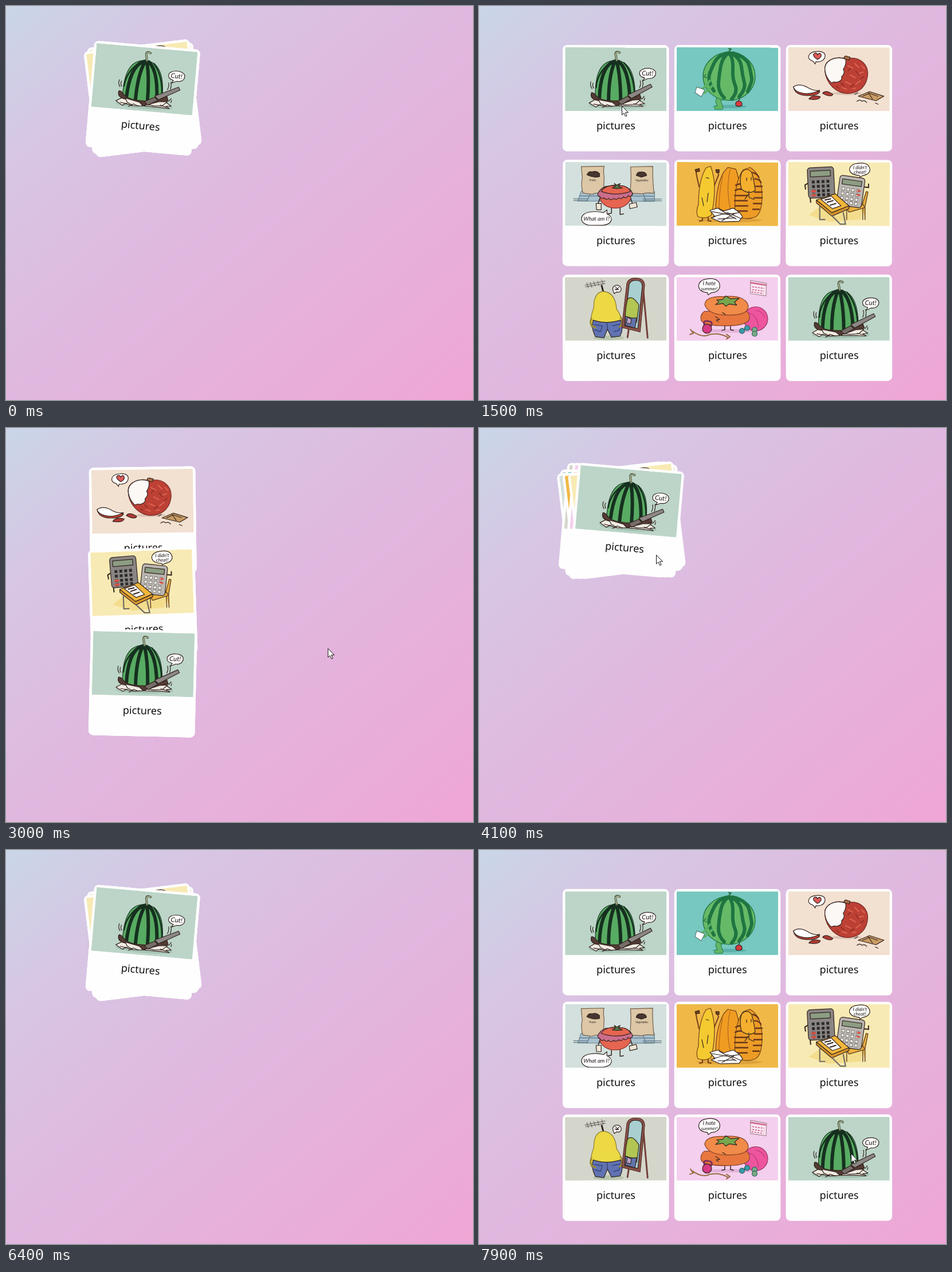
An HTML page for the animation above (8000 ms loop, 815 by 687 pixels).

```html
<!DOCTYPE html>
<html lang="en">
<head>
<meta charset="utf-8">
<title>Picture cards</title>
<style>
  html, body { margin: 0; width: 100%; height: 100%; overflow: hidden; }
  body { background: linear-gradient(to bottom right, #c9d6e8, #d7c6e4 20%, #e0b8df 50%, #efa6d6); }
  #stage { display: block; width: 815px; height: 687px; }
  text { font-family: "Noto Sans", sans-serif; text-anchor: middle; stroke: none; fill: #111; }
  .card text { font-size: 18px; }
  symbol { stroke: #33241f; stroke-width: 1.2; stroke-linejoin: round; stroke-linecap: round; fill: none; }
  symbol text { font: italic 500 9px Lato, sans-serif; fill: #2d2422; }
  .bg { stroke: none; }
  .bubble { fill: #fff; }
</style>
</head>
<body>
<svg id="stage" viewBox="0 0 815 687">
  <defs>
    <symbol id="cut" viewBox="0 0 177 111">
      <rect class="bg" width="177" height="111" fill="#bcd5c8"/>
      <ellipse class="bg" cx="92" cy="101" rx="50" ry="6" fill="#a6c3b5"/>
      <path d="M53 88C52 58 56 23 88 23C117 23 123 58 122 88Q88 104 53 88z" fill="#58ab62" stroke="#1f3a28"/>
      <path d="M84 25C68 31 61 58 60 88M87 24C79 42 76 66 76 92M90 24C95 44 97 66 97 94M94 25C107 36 112 62 113 90" stroke="#16301f" stroke-width="6"/>
      <path d="M103 27Q119 46 121 78M78 27Q56 44 54 70" stroke="#16301f" stroke-width="2.5"/>
      <path d="M90 23L88 12Q88 6 95 9" stroke="#4b5841" stroke-width="4"/>
      <path d="M90 22L88 12Q89 7 95 9" stroke="#a8b08f" stroke-width="2"/>
      <path d="M42 97l12-7 15 3 14 9-14 1-9-3-6 4zM92 102l11-9 26-1 10 6-9 1 6 4-16-1z" fill="#efeae2"/>
      <path d="M46 79c-3 9 4 14 16 14c10 2 16 9 28 9c14-7 30-9 43-13l-3-8c-8 7-22 11-36 12c-20 1-34-1-40-9q-3-5-8-5z" fill="#533b34"/>
      <path d="M58 91l25 5 7 6-17 1-11-5zM98 99l20-7 14-1-9 8-15 1z" fill="#efeae2"/>
      <path d="M109 83L149 64l3 5-36 20z" fill="#8c8784"/>
      <path d="M92 94l17-9 6 5-17 10z" fill="#776d68"/>
      <path d="M65 105l8-5 9 3M50 99l12 2M120 98l11 3M45 60q-2 7 2 12M49 62q-2 5 1 9M131 58q2 6-1 12M135 57q2 6 0 12M134 90l4-5M138 92l1-4"/>
      <path class="bubble" d="M139 53q-10-2-9-9c1-9 24-11 28-1c1 9-7 12-13 11l-9 4z"/>
      <text x="144" y="49" style="font-size:11.500px">Cut!</text>
    </symbol>
    <symbol id="reader" viewBox="0 0 177 111">
      <rect class="bg" width="177" height="111" fill="#76c8c0"/>
      <ellipse class="bg" cx="92" cy="103" rx="30" ry="3" fill="#5cb0aa"/>
      <path d="M85 87l-12 4 5 14h-9M74 84l-3 10 3 8" stroke="#2c7f48" stroke-width="7"/>
      <path d="M85 87l-12 4 5 14h-9M74 84l-3 10 3 8" stroke="#62b666" stroke-width="5"/>
      <ellipse cx="91.5" cy="50.500" rx="45.5" ry="42" fill="#66ba67" stroke="#21713f"/>
      <g stroke="#1f7541" stroke-width="6">
        <path d="M88 10Q72 14 66 26T57 48T65 76M90 10Q80 17 77 32T73 62T83 88M92 10Q99 20 98 37T102 66T96 90M95 10Q111 18 113 34T118 61T109 86M98 10Q123 16 127 34T131 56T124 77"/>
      </g>
      <path d="M92 10q-2-4 3-7l-4-1" stroke="#286b3d" stroke-width="2"/>
      <path d="M58 58l-10 12-7 4M62 67l-13 12-8-1" stroke="#5bb164" stroke-width="4"/>
      <path d="M35 69l14 5-6 12-11-7z" fill="#fff" stroke="#557d78"/>
      <path d="M51 47l-4 4 5 2M55 43l3 1" stroke="#1e613a"/>
      <path d="M108 93q-8 3-4 9q6 2 10-1q1-7-6-8zM108 93l2-3" fill="#d73b40"/>
    </symbol>
    <symbol id="lychee" viewBox="0 0 177 111">
      <rect class="bg" width="177" height="111" fill="#f2e0d1"/>
      <ellipse class="bg" cx="102" cy="80" rx="26" ry="3" fill="#dcc3b3"/>
      <path d="M102 20C124 14 142 30 138 52C134 74 116 82 98 80C76 76 62 54 64 34C66 22 84 14 102 20z" fill="#bd4035" stroke="#6f2822"/>
      <path d="M100 20C80 14 62 24 64 40C65 50 70 57 75 62q6-3 8-1q12-2 10-10q7-6 3-13q6-8 4-18z" fill="#fbf8f6"/>
      <path d="M104 32l8 4M116 28l7 7M124 45l7-2M108 48l9 5M100 60l9 4M118 64l8-6M94 70l8 3M112 72l6-1M128 32l5 5" stroke="#dc6551" stroke-width="2"/>
      <path d="M104 41l5-5M118 41l5 7M126 55l6-4M92 62l5 5M108 69l7-4M84 68l5 4" stroke="#7d2923"/>
      <path d="M98 20q-2-5 3-5l7 2-2 5z" fill="#a96c43"/>
      <path class="bubble" d="M50 7c12-1 15 5 14 9c-1 8-10 10-16 9l-1 4-4-5c-12-3-10-16 7-17z"/>
      <path d="M51 21q-11-7-5-11q4-1 5 3q3-5 6-1q2 5-6 9z" fill="#dd5a59"/>
      <path d="M9 69Q12 84 34 84Q52 84 55 77L34 76z" fill="#bd4035"/>
      <path d="M9 69Q18 62 32 69Q44 77 55 75Q36 84 21 79Q11 76 9 69z" fill="#fff"/>
      <path d="M36 90q5-8 20-4q-2 7-20 4zM60 80q5-7 18 2q-4 6-18-2z" fill="#b23a36"/>
      <path d="M122 85l20-8 25 8-14 8z" fill="#c99c64"/>
      <path d="M130 85l12-5 14 5M139 78l8 12M121 79l-5 3M120 94q4-4 9 0q4-3 8 2M152 97l5 2"/>
    </symbol>
    <symbol id="tomato" viewBox="0 0 177 111">
      <rect class="bg" width="177" height="111" fill="#d3e0dd"/>
      <path d="M28 51H156V68H22z" fill="#a8c1cf" stroke="#6f8794"/>
      <path d="M15 64H40M15 67H40M136 64h32M136 67h32M46 51l-8 17M66 51l-6 17M112 51l4 17M135 51l6 17M25 59H156" stroke="#617783"/>
      <path d="M28 8l40-1q-2 8 0 18l-1 31q-12-4-20 0l-16-2q-4-14-1-26zM114 8l39-1q-1 18 2 47q-14-2-20 1l-22-1q3-25 1-46z" fill="#dcc7a6" stroke="#745d4b"/>
      <path d="M38 22q3-7 9-5q7-3 13 3v5q-10 3-22-3zM124 23q2-7 8-6q9-1 10 6l-9 3z" fill="#463530"/>
      <text x="48" y="33" style="font-size:5px">Fruits</text>
      <text x="134" y="33" style="font-size:5px">Vegetables</text>
      <path d="M81 74v15l-6 1M96 74v17l6-1M61 62l-4 12M114 62l4 11" stroke-width="1.5"/>
      <ellipse cx="87.500" cy="60" rx="27" ry="20" fill="#e66550" stroke="#8a332c"/>
      <path d="M57 55q4-9 14-13h32q13 4 15 14q-5 6-8 2q-4 7-8 2q-4 6-8 2q-5 5-9 1q-5 5-9 0q-5 4-8-1q-5 4-8-3q-3 2-3-4z" fill="#cc6d8c"/>
      <path d="M63 51q5-9 17-10h20q11 2 14 10q-25 9-51 0z" fill="#e66550"/>
      <path d="M82 45l6-3-2-5 4 3 6-3-3 5 7 3-10 1z" fill="#557849"/>
      <path d="M54 72h9v11h-8zM112 73l12-3 2 8-13 3z" fill="#eee6d6"/>
      <path class="bubble" d="M67 88l6-5 0 7c12 5 11 18-7 20H43C24 108 24 90 43 87q13-2 24 1z"/>
      <text x="55" y="102" style="font-size:9.5px">What am I?</text>
    </symbol>
    <symbol id="bananas" viewBox="0 0 177 111">
      <rect class="bg" width="177" height="111" fill="#f0b847"/>
      <ellipse class="bg" cx="92" cy="101" rx="57" ry="4" fill="#dda23b"/>
      <path d="M39 43L35 25l-2-11M65 42l8-20-2-6M45 94v8l-5 1M55 94v8l5 1" stroke-width="2" stroke="#744116"/>
      <path d="M32 13l7-2 1 5-6 1zM68 13l6 0v5h-5z" fill="#744116"/>
      <path d="M51 10l8-3q7 18 7 40q-1 30-6 46q-10 7-23 2q-4-8 1-22q0-42 13-63z" fill="#f4ca30" stroke="#744116"/>
      <path d="M68 82Q69 40 82 17l7-8 14 3q10 25 6 73q-20 13-41-3z" fill="#f09c22" stroke="#744116"/>
      <path d="M80 24q-7 33-6 62M93 13q-8 36 2 74" stroke="#af661e"/>
      <path d="M102 92Q99 35 116 13l12-4q21 12 21 50q0 29-11 36-18 8-36-3z" fill="#ec9c25" stroke="#744116"/>
      <path d="M103 40q10-5 17 1M102 49q10-5 20 1M101 58h22M101 67h22M102 76h22M103 85h20M133 18q8 2 10 8M136 29q8 0 11 6M138 42h11M136 52h13M135 62h14M134 72h14M133 82h11" stroke="#69371c" stroke-width="2.5"/>
      <path d="M113 18q9-11 18 0q5 20 6 31q-11 8-24-2q-4-15 0-29z" fill="#f4af2e"/>
      <path d="M122 27v5M130 26v5M126 50v11l9 4M126 55l-7 9M51 27l5 1M44 62l3 14M55 54l-2 15"/>
      <path d="M58 84l14-4 10 5 17-5 11 8 5 7-6 8-33 1-16-7 7-2z" fill="#fff"/>
      <path d="M61 86l26 5 22-3M64 95l25-7 23 10M74 82l30 17M79 102l23-13M72 99l30-2"/>
    </symbol>
    <symbol id="calculators" viewBox="0 0 177 111">
      <rect class="bg" width="177" height="111" fill="#f8eab4"/>
      <path class="bg" d="M36 92l21-16 74 4-5 20-56 4z" fill="#f3dd8d"/>
      <path d="M36 36l-7 4 1 7M132 43l8 1v-6M38 60l1 10" stroke-width="2"/>
      <g transform="rotate(-3 56 35)">
        <rect x="34" y="9" width="46" height="53" rx="5" fill="#898583"/>
        <path d="M39 15h35v10H39z" fill="#8c9d83"/>
        <path d="M41 34h34M41 42h34M41 50h34M41 57h34" stroke="#2c2a2b" stroke-width="5" stroke-dasharray="5 3.5" stroke-linecap="butt"/>
        <path d="M41 57h5M41 50h5" stroke="#d95449" stroke-width="4"/>
      </g>
      <path d="M129 74l7-23 3 1-5 25v23M102 78v22M130 80v20M101 79l28-7 5 7-28 8z" fill="#edb13d" stroke="#70502b" stroke-width="1.6"/>
      <g transform="rotate(8 109 50)">
        <rect x="87" y="25" width="44" height="52" rx="5" fill="#bab6b1"/>
        <path d="M92 31h34v9H92z" fill="#8c9d83"/>
        <path d="M93 48h34M93 56h34M93 64h34M93 71h34" stroke="#55504d" stroke-width="5.500" stroke-dasharray="5 3.5" stroke-linecap="butt"/>
        <path d="M93.500 48h34M93.500 56h34M93.500 64h34M93.500 71h34" stroke="#f2eee7" stroke-width="4" stroke-dasharray="4 4.5" stroke-linecap="butt"/>
        <path d="M121 48h4M121 55h4" stroke="#d95449" stroke-width="3"/>
      </g>
      <path d="M49 66l33-11 24 21-30 12z" fill="#f0b53a"/>
      <path d="M49 66v5l27 23 30-13v-5L76 88z" fill="#d6942c"/>
      <path d="M55 77v23h9M76 93l15 15h9l-4-20" stroke="#716b63" stroke-width="2.2"/>
      <path d="M57 65l18-6 17 17-15 5z" fill="#fff"/>
      <path d="M64 66l10-2M68 70l10-3M73 75l10-3" stroke-width="2"/>
      <path class="bubble" d="M115 3q17-4 24 2c8 10 0 17-9 18l-5 3-1-3c-20-1-22-15-9-20z"/>
      <text x="125" y="12" style="font-size:8.500px">I didn't</text>
      <text x="125" y="20" style="font-size:8.500px">cheat!</text>
    </symbol>
    <symbol id="pear" viewBox="0 0 177 111">
      <rect class="bg" width="177" height="111" fill="#d5d6cb"/>
      <ellipse class="bg" cx="76" cy="106" rx="27" ry="4" fill="#b7c5ad"/>
      <path d="M35 14l35-7M36 17l34-6M38 10l3 9M44 9l3 9M50 8l3 8M57 7l2 8M64 5l3 8" stroke="#6d6962"/>
      <path d="M67 26l-3-11" stroke-width="3"/>
      <path d="M66 25Q50 27 50 54q-7 17-4 33h53q2-17-9-31Q88 26 66 25z" fill="#ecd944" stroke="#8c7b2f"/>
      <path d="M49 75q23 8 48 0q6 15-1 28l-15 2-7-14-6 15-15-2q-8-15-4-29z" fill="#6072b1"/>
      <path d="M73 79l1 12M51 83l14 2-3 10-11-3M83 85l13-3-2 11-9 2" stroke="#303d72"/>
      <path d="M46 72q-5 13 7 16M97 70q7 9-2 17" stroke="#9b8a36" stroke-width="3"/>
      <path class="bubble" d="M84 24c-4-11 12-13 14-4c0 7-5 7-8 6l-4 3z"/>
      <path d="M88 17l4 4M94 18l-5 5M87 21l7 1"/>
      <path d="M136 15l8 91M112 85l-3 20" stroke="#74413c" stroke-width="3"/>
      <path d="M108 11Q111 1 125 2q13 0 14 12l-8 82-32-8z" fill="#8b5148" stroke="#553330"/>
      <path d="M112 13q3-8 12-7 11 0 11 10l-8 74-23-5z" fill="#a9cfd0"/>
      <path d="M109 39q8-9 20 10l-4 30-20-4q0-20 4-36z" fill="#b2c653"/>
      <path d="M105 68q11 5 20 3l-3 18-17-5z" fill="#6173ab"/>
      <path d="M109 70l7 4-2 8-7-2z" fill="#b7a2c8"/>
    </symbol>
    <symbol id="persimmon" viewBox="0 0 177 111">
      <rect class="bg" width="177" height="111" fill="#f4cfee"/>
      <ellipse class="bg" cx="91" cy="94" rx="50" ry="3" fill="#e2b2d9"/>
      <circle cx="138" cy="73" r="21" fill="#ee559e" stroke="#96385f"/>
      <path d="M138 58q13 2 16 13M126 63q15 4 17 25" stroke="#b93b78"/>
      <path d="M84 82v10l-5 1M94 82v10l5 1" stroke-width="1.5"/>
      <path d="M48 60Q40 66 43 76q5 9 43 9 38 0 41-12 2-10-9-16z" fill="#e7773e" stroke="#854028"/>
      <path d="M49 48Q50 33 82 34q38-3 43 16 1 15-26 16-43 3-50-18z" fill="#f18b49" stroke="#854028"/>
      <path d="M70 40l10-1 6-6 8 5 15-1-8 7 4 5-13-2-6 4-5-5-13 2 6-5z" fill="#77a64d"/>
      <path d="M68 69l7 5-6 1 4 3M80 62l5 3"/>
      <path d="M49 84q-5-9 7-7 8 1 4 8" stroke="#802d5c" stroke-width="3"/>
      <circle cx="53" cy="90" r="8" fill="#d83a83"/>
      <path d="M24 91l5 7-6 2M27 94q18 13 31 6 17-3 31 5M87 100l6 4-6 4" stroke="#9a6b45" stroke-width="2"/>
      <g stroke="#315c64"><path d="M115 93l9-5" stroke-width="3"/><circle cx="114" cy="94" r="4.500" fill="#399ba8"/><circle cx="123" cy="89" r="4.500" fill="#399ba8"/><circle cx="136" cy="92" r="4.500" fill="#78ac83"/><circle cx="136" cy="99" r="4.500" fill="#78ac83"/></g>
      <path class="bubble" d="M46 5Q66-1 74 9c5 12-4 18-13 18l-6 4-1-4c-19-1-19-17-8-22z"/>
      <text x="57" y="14" style="font-size:9.500px">I hate</text>
      <text x="57" y="23" style="font-size:8px">summer!</text>
      <path d="M129 6l28 5-1 22-27-4z" fill="#fbe9f3" stroke="#a5848f"/>
      <path d="M130 10l25 4" stroke="#d07098" stroke-width="3"/>
      <path d="M132 17l21 3M132 22l21 3M131 26l21 3" stroke="#d07098" stroke-width="2" stroke-dasharray="3 2" stroke-linecap="butt"/>
    </symbol>
  </defs>
  <g id="cards"></g>
  <path id="cursor" d="M.5.5V16L4 12.700L6.500 18.500L9 17.500L6.500 11.800H11.500z" fill="#fff" stroke="#111"/>
</svg>
<script>
const LOOP = 8000, STEP = 100, MOVE = 400;
const PITCH_X = 194.75, PITCH_Y = 195;
const rowTilt = [-3, -7, 5];

// column by column, so each column lies over the one to its left
const pictures = ['cut', 'tomato', 'pear', 'reader', 'bananas', 'persimmon', 'lychee', 'calculators', 'cut'];

// start time, opens?, instant?
const phases = [
  [0, 0, true], [790, 1], [2484, 0], [4040, 1], [6400, 0, true], [7112, 1]
];

// pointer visits: time, x, y
const visits = [
  [[300, 678, 119], [500, 430, 150], [700, 249, 174], [1500, 249, 174], [1700, 249, 181], [1800, 249, 181],
   [2000, 400, 340], [2200, 627, 461], [2300, 620, 398], [2700, 620, 398], [3300, 503, 370],
   [3500, 375, 268], [3700, 309, 221], [4300, 309, 221], [4900, 807, 135]],
  [[6500, 780, 140], [6800, 400, 165], [7000, 250, 180], [7400, 250, 180], [7900, 649, 529]]
];

const cards = document.getElementById('cards');
const cursor = document.getElementById('cursor');
cards.innerHTML = pictures.map(name => `<g class="card">
  <rect width="185.500" height="185.500" rx="8" fill="#fefefe"/>
  <use href="#${name}" x="4.200" y="4.200" width="177" height="111"/>
  <text x="93" y="147">pictures</text></g>`).join('');

// cubic-bezier(.5, 0, .2, 1.23): a soft start and a small overshoot
function ease(x) {
  if (x <= 0) return 0;
  if (x >= 1) return 1;
  const curve = (s, a, b) => 3 * s * (1 - s) * ((1 - s) * a + s * b) + s ** 3;
  let low = 0, high = 1;
  for (let i = 0; i < 24; i++) {
    const mid = (low + high) / 2;
    if (curve(mid, .5, .2) < x) low = mid; else high = mid;
  }
  return curve(low, 0, 1.23);
}

function spread(t, delay) {
  const [start, opens, instant] = phases.findLast(phase => phase[0] <= t);
  const done = instant ? 1 : ease((t - start - delay) / MOVE);
  return opens ? done : 1 - done;
}

function pointerAt(t) {
  const path = visits.find(v => t >= v[0][0] && t < v.at(-1)[0] + STEP);
  if (!path) return null;
  const next = path.findIndex(point => point[0] > t);
  if (next < 0) return path.at(-1).slice(1);
  const [t0, x0, y0] = path[next - 1], [t1, x1, y1] = path[next];
  const k = (t - t0) / (t1 - t0);
  return [x0 + (x1 - x0) * k, y0 + (y1 - y0) * k];
}

function draw() {
  const t = Math.floor((performance.now() + 2) % LOOP / STEP) * STEP;
  const across = spread(t, 0), down = spread(t, MOVE);
  [...cards.children].forEach((card, i) => {
    const column = Math.floor(i / 3), row = i % 3;
    const x = 146 + column * PITCH_X * across;
    const y = 68 + row * PITCH_Y * down;
    card.setAttribute('transform', `translate(${x} ${y}) rotate(${rowTilt[row] * (1 - down)} 93 93)`);
  });
  const pointer = pointerAt(t);
  cursor.setAttribute('visibility', pointer ? 'visible' : 'hidden');
  if (pointer) cursor.setAttribute('transform', `translate(${pointer})`);
  requestAnimationFrame(draw);
}
draw();
</script>
</body>
</html>
```
